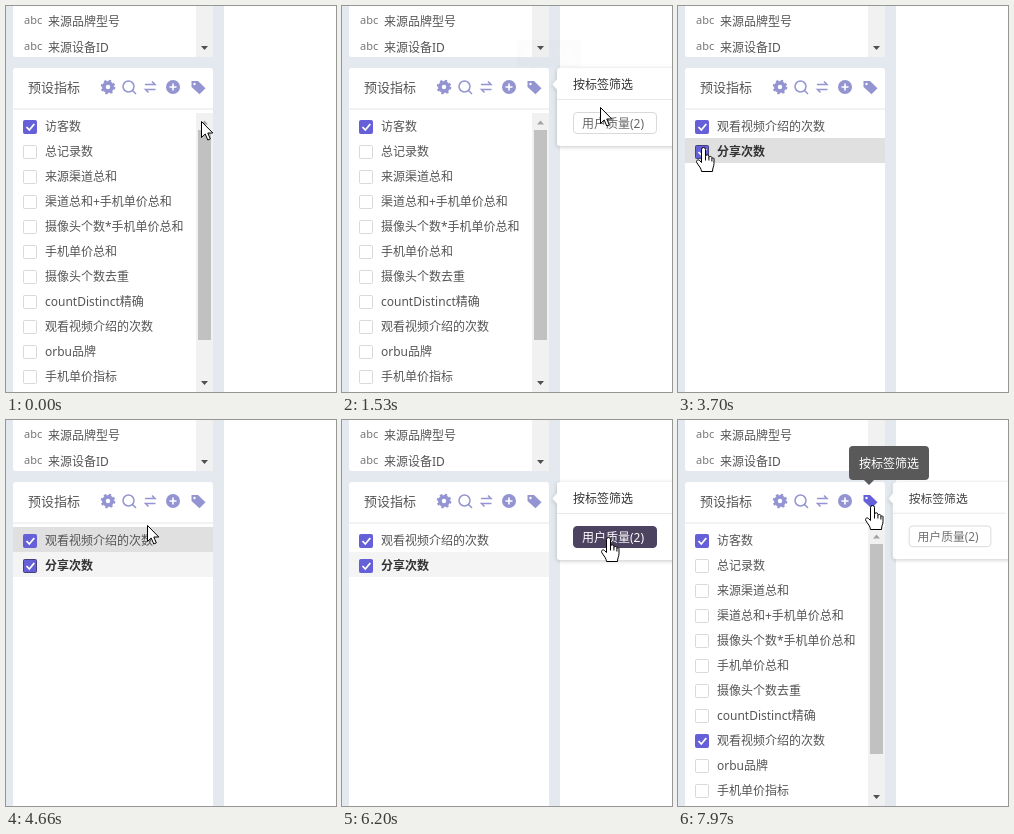
These frames come from a looping animation (330x386 px, 8000 ms). An HTML page:

```html
<!DOCTYPE html>
<html lang="zh-CN">
<head>
<meta charset="utf-8">
<title>预设指标</title>
<style>
html, body { margin: 0; width: 100%; height: 100%; overflow: hidden; background: #e4e9ef; }
svg { display: block; width: 330px; height: 386px; }
text { font: 12px "Noto Sans", "Noto Sans CJK SC", "Noto Sans CJK", sans-serif; fill: #555; white-space: pre; }
.abc { font-size: 11px; fill: #777; }
.head { font-size: 13px; }
.bold { font-weight: 700; fill: #333; }
.title { fill: #333; }
.icons, #tag { fill: #9494d2; }
.line { fill: none; stroke: #9494d2; stroke-width: 1.5; }
.cursor { fill: #fff; stroke: #000; stroke-width: 1; stroke-linejoin: round; }
</style>
</head>
<body>
<svg viewBox="0 0 330 386">
  <defs>
    <filter id="shadow" x="-10%" y="-15%" width="120%" height="135%">
      <feDropShadow dx="0" dy="1" stdDeviation="2" flood-opacity=".22"/>
    </filter>
  </defs>
  <rect width="330" height="386" fill="#e4e9ef"/>
  <rect x="7" y="-6" width="200" height="57" rx="3" fill="#fff"/>
  <rect x="7" y="62" width="200" height="330" rx="3" fill="#fff"/>
  <rect x="218" y="-6" width="120" height="400" fill="#fff"/>

  <text class="abc" x="18" y="18">abc</text><text x="42" y="19.5">来源品牌型号</text>
  <text class="abc" x="18" y="44">abc</text><text x="42" y="45.5">来源设备ID</text>
  <rect x="190" width="17" height="51" fill="#f1f1f1"/>
  <path d="M195 40h7l-3.500 4z" fill="#505050"/>

  <text class="head" x="22" y="86">预设指标</text>
  <path d="M7 103h200" stroke="#e6e6e6"/>
  <g class="icons">
    <circle class="line" cx="102" cy="81" r="4.1" style="stroke-width:3.8"/>
    <circle class="line" cx="102" cy="81" r="6.2" style="stroke-width:2.2" stroke-dasharray="2.435"/>
    <circle class="line" cx="122.5" cy="80.5" r="5.5"/>
    <path class="line" d="M126.5 84.5l3.5 3.5M139 78.5h10l-3-3M149.500 83.500h-10l3 3"/>
    <circle cx="167" cy="81" r="7"/>
    <path d="M163.500 81h7M167 77.500v7" stroke="#fff" stroke-width="1.6"/>
  </g>
  <g id="tag">
    <path d="M186 75h6l7.500 7.300-6 6-8-7.300V75.500z"/>
    <circle cx="188.500" cy="78" r="1.200" fill="#fff"/>
  </g>

  <g id="full">
    <rect x="190" y="107" width="17" height="279" fill="#f1f1f1"/>
    <rect x="192" y="124" width="13" height="210" fill="#c1c1c1"/>
    <path d="M195 118.500h7l-3.500-4z" fill="#a3a3a3"/>
    <path d="M195 375h7l-3.500 4z" fill="#505050"/>
  </g>
  <g id="short"></g>

  <g id="pop">
    <g filter="url(#shadow)">
      <rect x="215" y="62" width="130" height="78" rx="3" fill="#fff"/>
      <path d="M215.500 73l-5 5.500 5 5.500z" fill="#fff"/>
    </g>
    <text class="title" x="231" y="83">按标签筛选</text>
    <path d="M215 93.500h115" stroke="#e8e8e8"/>
    <rect id="chip" x="231.500" y="106.500" width="83" height="21" rx="3.500"/>
    <text id="chipText" x="240" y="121.500">用户质量(2)</text>
  </g>

  <g id="tip">
    <path d="M175 26h72a4 4 0 0 1 4 4v26a4 4 0 0 1-4 4h-51l-5 5-5-5h-11a4 4 0 0 1-4-4V30a4 4 0 0 1 4-4z" fill="#595959"/>
    <text x="181" y="48" style="fill:#fff">按标签筛选</text>
  </g>

  <path id="arrow" class="cursor" d="M0 0V16L3.700 12.500L6.300 18.500L8.800 17.400L6.300 11.500H11.300Z"/>
  <g id="hand" class="cursor">
    <path d="M-2 15V2a2 2 0 0 1 4 0V9a1.700 1.700 0 0 1 3.400 0v1a1.600 1.600 0 0 1 3 0v1a1.200 1.200 0 0 1 2.100 0V16c0 3-1.500 4-1.500 8H-2C-2 21-5 18-6.500 15.500C-8 13-5.500 11.500-4 13Z"/>
    <path d="M2 9v4M5.400 10v3M8.400 11v3" fill="none"/>
  </g>
</svg>
<script>
const LOOP = 8000;
const $ = id => document.getElementById(id);

function add(parent, tag, attrs, text = '') {
  const el = document.createElementNS('http://www.w3.org/2000/svg', tag);
  for (const k in attrs) el.setAttribute(k, attrs[k]);
  el.textContent = text;
  parent.append(el);
  return el;
}

function addRow(parent, label, i, bold) {
  const y = 107 + 25 * i;
  const back = add(parent, 'rect', { x: 7, y, width: parent.id === 'full' ? 183 : 200, height: 25 });
  const box = add(parent, 'rect', { x: 17.5, y: y + 7.5, width: 13, height: 13, rx: 1 });
  const mark = add(parent, 'path', {
    d: `M20.500 ${y + 14}l2.800 3 5-6`, fill: 'none', stroke: '#fff', 'stroke-width': 1.8 });
  add(parent, 'text', { x: 39, y: y + 18, class: bold ? 'bold' : '' }, label);
  return { y, back, box, mark };
}

const labels = ['访客数', '总记录数', '来源渠道总和', '渠道总和+手机单价总和', '摄像头个数*手机单价总和',
  '手机单价总和', '摄像头个数去重', 'countDistinct精确', '观看视频介绍的次数', 'orbu品牌', '手机单价指标'];
const fullRows = labels.map((s, i) => addRow($('full'), s, i));
const shortRows = ['观看视频介绍的次数', '分享次数'].map((s, i) => addRow($('short'), s, i, i === 1));

// The screen refreshes in bursts: first time, last time, count.
const bursts = [[140, 1080, 7], [1240, 1530, 3], [1660, 1810, 2], [2080, 2980, 7], [3130, 4120, 8],
  [4240, 4660, 4], [4780, 5170, 4], [5330, 6200, 7], [6500, 7170, 6], [7310, 7450, 2], [7970, 7970, 1]];
const ticks = [0];
for (const [a, b, n] of bursts)
  for (let i = 0; i < n; i++) ticks.push(Math.floor(a + (b - a) * i / Math.max(1, n - 1)));

// Pointer: time, x, y
const path = [[0, 195, 115], [140, 186, 113], [450, 194, 88], [1100, 194, 88], [1240, 206, 88],
  [1530, 258, 101], [1810, 268, 117], [2230, 268, 117], [2980, 26, 120], [3270, 26, 120],
  [3550, 25, 141], [4240, 25, 141], [4660, 141, 105], [4900, 194, 88], [5620, 195, 89],
  [6200, 266, 117], [6640, 266, 117], [7170, 197, 86], [7450, 194, 85], [LOOP, 194, 85]];

const ramp = (t, a, b) => Math.min(1, Math.max(0, (t - a) / (b - a)));
const between = (t, a, b) => t >= a && t < b;

function pointer(t) {
  const i = path.findIndex(p => p[0] > t);
  const [a, x, y] = path[i - 1], [b, u, v] = path[i];
  const k = (t - a) / (b - a);
  return [Math.round(x + (u - x) * k), Math.round(y + (v - y) * k)];
}

function zoom(el, v, ox, oy) {
  el.style.display = v > 0 ? '' : 'none';
  el.setAttribute('opacity', v);
  el.setAttribute('transform', `translate(${ox} ${oy}) scale(${0.8 + 0.2 * v}) translate(${-ox} ${-oy})`);
}

function paintRow(row, checked, back, focus) {
  row.back.setAttribute('fill', back);
  row.box.setAttribute('fill', checked ? '#6560d8' : '#fff');
  row.box.setAttribute('stroke', focus ? '#45417f' : checked ? '#6560d8' : '#d9d9d9');
  row.mark.style.display = checked ? '' : 'none';
}

function draw(time) {
  const t = ticks.filter(s => s <= time).pop();
  const [x, y] = pointer(t);
  const filtered = between(t, 2230, 6630);
  const selected = between(t, 2080, 6500);
  const inRow = (row, right) => x > 7 && x < right && y >= row.y - (row.y === 107 ? 3 : 0) && y < row.y + 25;

  $('full').style.display = filtered ? 'none' : '';
  $('short').style.display = filtered ? '' : 'none';
  fullRows.forEach((r, i) =>
    paintRow(r, i === 0 || (i === 8 && t >= 3130), inRow(r, 190) ? '#e0e0e0' : '#fff'));
  shortRows.forEach((r, i) =>
    paintRow(r, t >= [3130, 3680][i], inRow(r, 207) ? '#e0e0e0' : i ? '#f4f4f4' : '#fff',
      i === 1 && between(t, 3680, 5470)));

  const tip = ramp(t, 450, 750) - ramp(t, 1240, 1534) + ramp(t, 5010, 5220) - ramp(t, 5740, 6050) + ramp(t, 7200, 7420);
  const pop = ramp(t, 700, 1000) - ramp(t, 3130, 3430) + ramp(t, 5440, 5645) - ramp(t, 7950, 8200);
  zoom($('tip'), tip, 191, 65);
  zoom($('pop'), pop, 213, 78);

  const overIcon = x > 183 && x < 202 && y > 72 && y < 92;
  const overChip = pop > 0 && x > 231 && x < 315 && y > 106 && y < 128;
  const overBox = x < 34 && y > 107;
  const grey = !selected && (overChip || between(t, 6500, 7300));
  $('tag').style.fill = overIcon ? '#6560d8' : '';
  $('chip').setAttribute('fill', selected ? '#4b435f' : grey ? '#e8e8e8' : '#fff');
  $('chip').setAttribute('stroke', selected ? '#4b435f' : '#d9d9d9');
  $('chipText').style.fill = selected ? '#fff' : '#666';

  const hand = overIcon || overChip || overBox;
  $('hand').style.display = hand ? '' : 'none';
  $('arrow').style.display = hand ? 'none' : '';
  $(hand ? 'hand' : 'arrow').setAttribute('transform', `translate(${x + 0.5} ${y + 0.5})`);
}

const start = performance.now();
function frame() {
  draw((performance.now() - start) % LOOP);
  requestAnimationFrame(frame);
}
frame();
</script>
</body>
</html>
```
